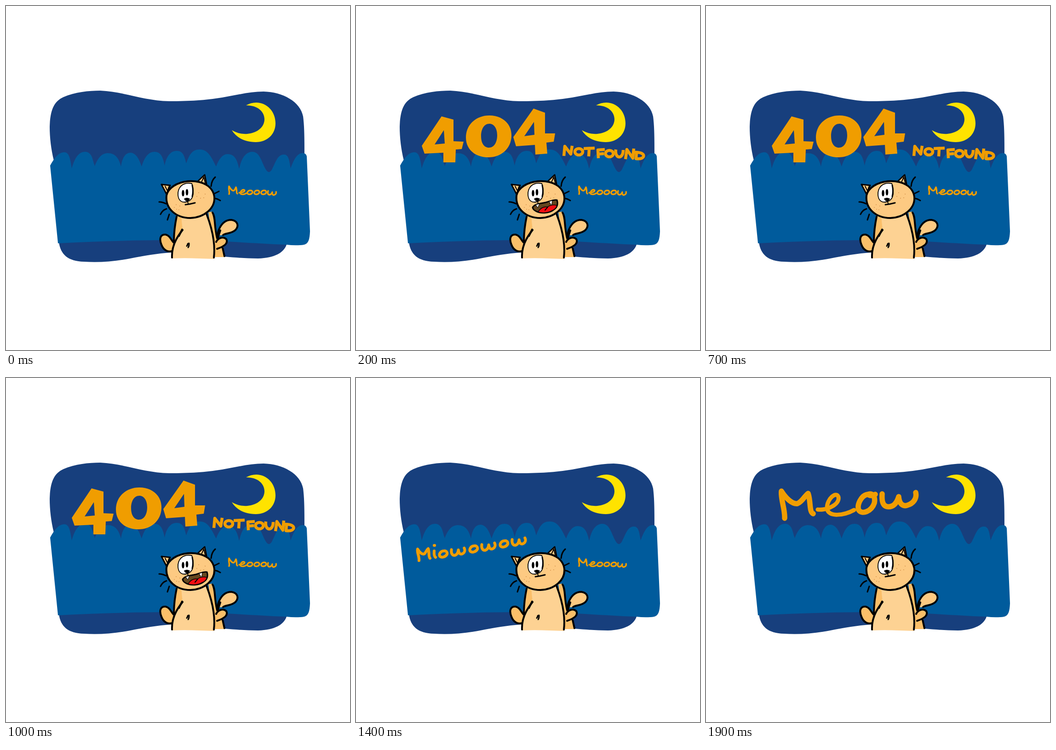
An HTML page for the animation above (2 s loop, 748 by 748 pixels).

```html
<!DOCTYPE html>
<html lang="en">
<head>
<meta charset="utf-8">
<title>404 Not Found</title>
<style>
  html, body { margin: 0; width: 100%; height: 100%; overflow: hidden; background: #fff; }
  svg { display: block; width: 100%; height: 100%; }
  .ink { fill: none; stroke: #000; stroke-width: 4; stroke-linecap: round; stroke-linejoin: round; }
  .fine { stroke-width: 3; }
  .thin { stroke-width: 2; }
  .belly { fill: #fdd293; }
  .fur { fill: #fdca82; }
  .shade { fill: #fbbf69; }
  .hand { fill: none; stroke: #f09d00; stroke-linecap: round; stroke-linejoin: round; }
  .block { fill: #f09d00; fill-rule: evenodd; }
  .caps { fill: none; stroke: #f09d00; stroke-width: 6.5; stroke-linejoin: round; }
</style>
</head>
<body>
<svg viewBox="0 0 748 748" role="img" aria-label="404 not found, meow">
  <!-- night sky -->
  <path fill="#173f7d" d="M104 336C98 312 95 286 95 263C96 225 105 207 125 198C150 187 180 184 205 184C255 186 300 206 355 207C400 207 433 205 470 199C500 194 530 186 560 186C602 187 640 208 646 240C649 262 649 295 649 325L610 519C604 536 585 548 548 549C520 549 500 547 475 545L358 536C330 538 300 543 270 549C235 556 200 558 170 556C134 555 119 540 115 514Z"/>
  <!-- hedge -->
  <path fill="#005b9c" d="M96 347C103 335 112 318 127 318C138 318 140 335 143 353C148 335 156 317 172 317C188 318 188 335 193 348C200 330 208 320 222 320C238 320 246 332 250 349C252 333 258 319 271 319C284 320 290 335 295 349C300 332 308 317 323 317C338 317 342 332 345 347C348 330 356 315 371 315C386 315 388 328 392 342C398 325 404 312 421 312C440 312 447 330 457 349C462 335 470 322 482 322C498 322 503 336 507 354C511 336 518 318 535 317C553 317 555 340 566 357C570 363 574 362 578 356C587 338 591 323 604 323C615 323 616 336 619 353C624 338 632 321 643 320C649 319 653 322 654 327L661 490C660 513 656 520 640 520Q625 521 610 519C560 517 520 514 475 512C400 508 250 508 113 516Z"/>
  <!-- moon -->
  <path fill="#ffe300" d="M522 216C529 212 536 210 544 210C568 210 586 230 586 255C586 279 568 296 543 296C518 296 501 286 491 270C503 277 515 279 525 278C547 276 562 263 562 246C562 231 549 216 522 216Z"/>

  <!-- arms, tail and torso -->
  <path class="shade" d="M440 448L450 447Q457 465 456 490L460 503L478 506L472 527L476 546L452 546Z"/>
  <path class="fur ink" d="M461 499Q460 491 464 484C470 471 479 465 490 465C504 467 507 478 499 487C489 496 478 493 472 498"/>
  <path class="shade ink" d="M457 513C462 503 473 501 479 507C483 515 477 522 459 528"/>
  <path class="ink" d="M449 449C456 460 452 476 459 505M466 488L460 506M471 526L475 544"/>
  <path class="belly" d="M371 456Q365 485 364 515L361 549C390 547 420 549 453 550C456 515 447 478 436 449Z"/>
  <path class="shade" d="M371 456Q365 486 364 516L384 487L381 458Z"/>
  <path class="shade ink" d="M364 514C358 507 356 499 347 497C335 496 333 507 338 519C342 530 351 536 361 533"/>
  <path class="ink" d="M371 458Q365 486 365 514M384 487C369 505 360 526 361 547"/>
  <path class="ink" d="M436 452C446 478 456 513 452 547M383 486L376 500"/>
  <path class="ink fine" d="M398 516C393 516 396 520 393 522M398 517Q398 523 396 525"/>

  <!-- head -->
  <path class="fur ink fine" d="M357 390L338 388L349 409Z"/>
  <path class="fur ink fine" d="M416 382L432 367L436 387Z"/>
  <path class="ink thin" d="M346 392L351 402L355 391M425 383L430 372L433 384"/>
  <path class="fur ink" d="M349 412C352 396 372 383 396 381C427 379 450 392 453 415C455 440 431 460 401 461C370 461 346 441 349 412Z"/>
  <path class="ink fine" d="M333 426Q340 426 348 430M336 453Q340 444 349 441M351 465L355 453M446 392Q447 379 455 372M453 408L463 403M453 418Q460 419 466 423"/>
  <path fill="#fff" stroke="#000" stroke-width="1.800" d="M404 386C384 382 373 395 374 411C375 424 383 428 392 426C402 424 407 416 407 406Q407 395 404 386Z"/>
  <path class="ink fine" d="M405 390Q408 402 405 414"/>
  <ellipse cx="385" cy="407" rx="2.800" ry="7"/>
  <ellipse cx="393.500" cy="405" rx="2.800" ry="7"/>
  <path d="M387 419Q393 415 400 419Q398 424 394 425Q389 424 387 419Z"/>
  <path class="ink thin" d="M394 423L396 429"/>
  <path fill="none" stroke="#b5651d" stroke-width="1.400" stroke-linecap="round" d="M370 432h0M378 435h0M366 438h0M376 443h0M371 442h0M415 414h0M419 406h0M430 417h0M423 418h0M433 409h0"/>

  <path id="closed" class="ink fine" d="M390 432Q400 431 411 428"/>
  <g id="open">
    <path id="lips" class="ink fine" style="fill:#65471f" d="M384 438C388 430 401 430 413 427C423 424 432 420 437 422C440 431 437 439 430 443C420 451 401 452 391 446Q385 443 384 438Z"/>
    <path fill="#f20d12" stroke="#000" stroke-width="1.500" d="M396 448C401 439 408 436 416 437C422 433 431 431 437 434Q435 441 428 444C418 450 407 451 396 448Z"/>
    <path class="ink thin" d="M411 444L417 437"/>
    <path fill="#fff" stroke="#000" d="M391 432L395 439L399 430ZM420 425L425 434L427 423Z"/>
  </g>

  <!-- lettering -->
  <g id="notFound">
    <path class="block" d="M186 240L212 247L212 294L234 295L230 311L217 312L216 340L190 340L190 319L149 321L143 304ZM191 270L171 301L193 299Z"/>
    <path class="block" d="M386 223L411 232L411 277L433 277L430 295L414 297L416 321L390 323L389 302L348 305L342 285ZM387 252L366 283L388 280Z"/>
    <path class="block" d="M239 286C239 257 262 238 290 238C319 238 339 257 338 283C337 311 315 329 288 329C259 329 239 312 239 286ZM272 283C272 299 279 308 289 308C300 308 307 297 307 281C307 266 300 256 290 256C279 256 272 267 272 283Z"/>
    <path class="caps" d="M452 326L454 305L467 322L470 304M495 310L519 309M507 310L506 327M527 331L526 313L541 312M527 322L539 321M565 312C562 332 581 335 581 313M586 333L589 312L602 331L604 310M610 317L609 332C630 335 633 317 606 318"/>
    <ellipse class="caps" cx="484.500" cy="317" rx="8.500" ry="7"/>
    <ellipse class="caps" cx="551" cy="321" rx="8.500" ry="7"/>
  </g>
  <g id="meow" class="hand" stroke-width="11.500">
    <path d="M171 305C172 285 162 263 164 246C174 262 188 275 199 273C209 269 214 257 222 251C228 266 224 292 233 295"/>
    <path stroke-width="9" d="M243 286C265 288 291 274 288 259C284 245 263 262 263 283C265 304 300 299 322 287"/>
    <path d="M352 253C337 255 328 276 332 287C339 298 360 290 366 272C369 257 361 249 352 253Q359 258 368 253"/>
    <path d="M383 252C382 267 384 280 397 280C410 280 416 268 419 258C420 271 426 280 437 277C451 273 459 262 456 249"/>
  </g>
  <g id="miowowow" class="hand" stroke-width="6.200"></g>
  <g id="meooow" class="hand" stroke-width="3.400"></g>
</svg>
<script>
const LOOP = 2000;
const byId = id => document.getElementById(id);

// Small handwritten letters, drawn around their own centre.
const glyphs = {
  o: "M1-7C-6-7-10 0-8 4C-4 9 5 6 8 0C9-5 5-8 1-7",
  w: "M-14-6C-16 2-13 7-8 7C-3 6 0 1 1-4C1 3 4 7 9 5C14 3 16-2 14-7"
};

function letter(group, d, x, y, scale = 1, turn = 0) {
  const path = document.createElementNS("http://www.w3.org/2000/svg", "path");
  path.setAttribute("d", glyphs[d] || d);
  path.setAttribute("transform", `translate(${x} ${y}) rotate(${turn}) scale(${scale})`);
  path.setAttribute("stroke-width", group.getAttribute("stroke-width") / scale);
  group.append(path);
}

const long = byId("miowowow");
letter(long, "M137 397C138 388 132 379 134 372C138 379 144 385 149 382C153 378 154 373 157 371C160 379 157 389 161 392M170 376Q169 387 173 390M170 364h1", 0, 0);
for (let i = 0; i < 3; i++) {
  letter(long, "o", 190 + 66 * i, 383 - 11 * i);
  letter(long, "w", 222 + 66 * i, 378 - 11 * i, 1, -5);
}

const short = byId("meooow");
letter(short, "M485 409C487 404 483 398 485 392C489 400 494 404 497 400L500 394C503 400 500 407 503 408M507 406C516 406 521 402 518 400C514 398 507 405 511 409Q516 411 523 407", 0, 0);
for (let i = 0; i < 3; i++) letter(short, "o", 530.5 + 15 * i, 405.5, 0.65, 8);
letter(short, "w", 578, 407, 0.62, 9);

// Spans in ms during which each part is visible.
const spans = {
  open: [[100, 300], [500, 700], [900, 1100], [1300, 1400]],
  notFound: [[200, 1400]],
  miowowow: [[900, 1000], [1100, 1900]],
  meow: [[1600, 2000]],
  meooow: [[0, 1700]]
};

const show = (id, on) => byId(id).setAttribute("visibility", on ? "visible" : "hidden");

function draw(time) {
  const on = id => spans[id].some(([from, to]) => time >= from && time < to);
  for (const id in spans) show(id, on(id));
  show("closed", !on("open"));
}

const start = performance.now();
function tick(now) {
  draw(Math.max(0, now - start) % LOOP);
  requestAnimationFrame(tick);
}
draw(0);
requestAnimationFrame(tick);
</script>
</body>
</html>
```
